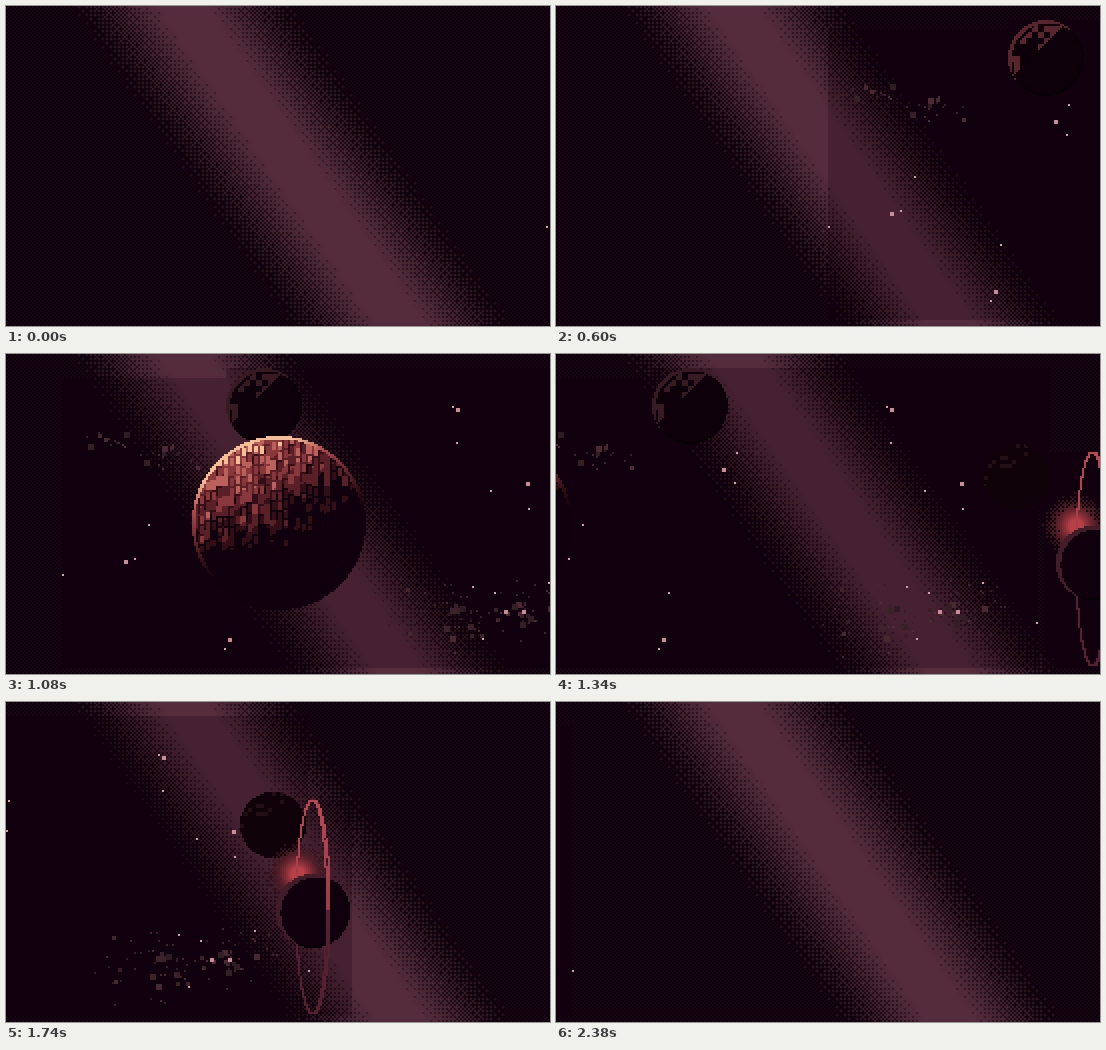
An HTML page with a canvas that plays this animation: 544 px wide and 320 px high, repeating every 2.4 s.

```html
<!DOCTYPE html>
<html lang="en">
<head>
<meta charset="utf-8">
<title>Drifting planets</title>
<style>
html, body { margin: 0; width: 100%; height: 100%; overflow: hidden; background: #11000e; }
canvas { display: block; width: 544px; height: 320px; }
</style>
</head>
<body>
<canvas id="stage" width="544" height="320"></canvas>
<script>
const W = 544, H = 320, STEP = 20, FRAMES = 120, CELL = 2;
const ctx = document.getElementById('stage').getContext('2d');
ctx.imageSmoothingEnabled = false;

// Each layer drifts left at its own constant speed, in pixels per step.
const LAYERS = {
  stars: { start: 540, speed: 8.945 },
  moon: { start: 780.3, speed: 9.66 },
  darkMoon: { start: 1108.2, speed: 9.66 },
  ringed: { start: 1305.9, speed: 11.47 },
  giant: { start: 1697.6, speed: 26.4 }
};

const clamp = v => Math.max(0, Math.min(1, v));
const snap = v => Math.round(v / CELL) * CELL;
const mix = (a, b, t) => a.map((v, i) => Math.round(v + (b[i] - v) * t));
const rgb = c => `rgb(${c.join(',')})`;

// Ordered 4x4 dither threshold, built by interleaving coordinate bits.
function threshold(x, y) {
  const d = x ^ y;
  const rank = (d & 1) * 8 + (y & 1) * 4 + (d >> 1 & 1) * 2 + (y >> 1 & 1);
  return (rank + 0.5) / 16;
}

function hash(x, y) {
  const s = Math.sin(x * 127.1 + y * 311.7) * 43758.5453;
  return s - Math.floor(s);
}
const spread = (i, seed) => hash(i, seed) + hash(i, seed + 1) - 1;

function ramp(colors, v) {
  const p = clamp(v) * (colors.length - 1), i = Math.min(Math.floor(p), colors.length - 2);
  return mix(colors[i], colors[i + 1], p - i);
}

function layer(w, h) {
  const c = document.createElement('canvas');
  c.width = w;
  c.height = h;
  return [c, c.getContext('2d')];
}

// shade returns a colour for a cell, or nothing.
function sprite(w, h, shade) {
  const [c, g] = layer(w * CELL, h * CELL);
  for (let y = 0; y < h; y++) {
    for (let x = 0; x < w; x++) {
      const color = shade(x, y);
      if (!color) continue;
      g.fillStyle = rgb(color);
      g.fillRect(x * CELL, y * CELL, CELL, CELL);
    }
  }
  return c;
}

function sphere(radius, shade) {
  const size = Math.ceil(radius * 2);
  return sprite(size, size, (x, y) => {
    const nx = (x + 0.5 - size / 2) / radius, ny = (y + 0.5 - size / 2) / radius;
    const d = Math.hypot(nx, ny);
    if (d <= 1) return shade(nx, ny, d, x, y);
  });
}

function nebula(base, alt, edge, core) {
  return sprite(W / CELL, H / CELL, (x, y) => {
    const d = Math.abs(x * CELL - 176 - y * CELL * 0.6875);
    const v = clamp((114 - d) / 90);
    const ground = (x + y) & 1 ? base : alt;
    const lit = mix(edge, core, v);
    return v > threshold(x, y) ? lit : mix(ground, lit, v * v * 0.75);
  });
}

const backdrop = nebula([22, 5, 18], [13, 0, 11], [32, 18, 22], [84, 44, 60]);
const haze = nebula([17, 0, 14], [17, 0, 14], [24, 11, 12], [69, 33, 49]);

const NIGHT = [16, 0, 13];
const LAVA = [NIGHT, [58, 18, 25], [112, 42, 48], [172, 74, 76], [244, 190, 150]];
const giant = sphere(43.5, (nx, ny, d, x, y) => {
  const light = -0.4 * nx - 0.85 * ny + 0.12 * Math.sqrt(1 - d * d) - 0.03;
  if (d > 0.965) return ramp(LAVA, light + 0.25);
  const col = Math.floor(x / 3), shift = y + Math.floor(hash(col, 5) * 6);
  const row = Math.floor(shift / 5);
  const seam = (x % 3 === 0 || shift % 5 === 0) && hash(row, col) > 0.35;
  const v = light + spread(col * 31 + row, 8) * 0.35 - (seam ? 0.3 : 0);
  return ramp(LAVA, Math.round(v * 5) / 5);
});

function cratered(tone) {
  return sphere(19, (nx, ny, d, x, y) => {
    const depth = -nx - ny;
    if (d > 0.95 && depth < -0.1) return [7, 0, 6];
    const rim = Math.hypot(nx - 0.07, ny - 0.08) > 0.99;
    const block = depth > 0.4 && depth < 1.15 && hash(x / 3 | 0, y / 3 | 0) > 0.66;
    return rim || block ? tone : [13, 0, 10];
  });
}
const moonBright = cratered([88, 37, 46]);
const moonDim = cratered([55, 26, 34]);

const darkMoon = sphere(16.5, (nx, ny, d, x, y) => {
  const v = -0.5 * nx - 0.6 * ny;
  return hash(x >> 1, y >> 1) < v * 0.4 ? [34, 15, 20] : [15, 2, 9];
});

const ringedBody = sphere(18.5, (nx, ny, d) => {
  if (d > 0.95 && nx + ny > 0.5) return [9, 0, 7];
  return Math.hypot(nx - 0.1, ny - 0.06) > 0.97 && nx < 0.5 ? [66, 28, 40] : NIGHT;
});

const glow = sprite(34, 34, (x, y) => {
  const v = 1 - Math.hypot(x - 16.5, y - 16.5) / 17;
  if (v > 0 && v * 2 > threshold(x, y)) return mix([48, 17, 26], [184, 65, 72], clamp(v * v * 1.5));
});

// Distances are measured from the left end of the star layer.
const ANCHORS = [[64, 208], [228, 116], [168, 286], [396, 56], [466, 130], [444, 258], [462, 258]];
const CLUMPS = [
  { x: 44, y: 86, w: 32, h: 14, count: 13 },
  { x: 110, y: 99, w: 40, h: 18, count: 18 },
  { x: 395, y: 264, w: 75, h: 40, count: 50 },
  { x: 460, y: 250, w: 62, h: 40, count: 42 }
];

const starField = (() => {
  const [c, g] = layer(W, H);
  const dot = (x, y, size, color) => {
    g.fillStyle = color;
    g.fillRect(snap(x - size / 2), snap(y - size / 2), size, size);
  };
  CLUMPS.forEach(({ x, y, w, h, count }, k) => {
    for (let i = 0; i < count; i++) {
      const size = i % 4 ? 2 : i % 8 ? 6 : 4;
      const color = mix([46, 28, 34], [80, 44, 53], hash(i, k + 20));
      dot(x + spread(i, k * 4) * w, y + spread(i, k * 4 + 2) * h, size, rgb(color));
    }
  });
  ANCHORS.forEach(([x, y], k) => {
    for (let i = 0; i < 2; i++) {
      dot(x + spread(k * 2 + i, 40) * 50, y + spread(k * 2 + i, 44) * 50, 2, '#d0a0a8');
    }
    dot(x, y, 4, '#c98c98');
  });
  dot(1, 221, 2, '#d0a0a8');
  dot(540, 269, 2, '#d0a0a8');
  return c;
})();

function ringHalf(side) {
  const [c, g] = layer(40, 220);
  const trace = (rx, ry) => {
    for (let a = -Math.PI / 2; a <= Math.PI / 2; a += 0.008) {
      const y = Math.sin(a) * ry;
      g.fillStyle = y < 4 ? rgb(mix([156, 60, 70], [184, 72, 84], -y / ry)) : '#55202f';
      g.fillRect(snap(20 + side * Math.cos(a) * rx) - 2, snap(110 + y) - 2, 2, 2);
    }
  };
  trace(17, 107);
  if (side > 0) trace(14, 106);
  return c;
}
const ringBack = ringHalf(-1), ringFront = ringHalf(1);

function clear(left, top, right, bottom) {
  const x = Math.max(0, snap(left)), w = Math.min(W, snap(right)) - x;
  if (w > 0) ctx.drawImage(haze, x, top, w, bottom - top, x, top, w, bottom - top);
}

function place(img, cx, cy) {
  ctx.drawImage(img, snap(cx - img.width / 2), snap(cy - img.height / 2));
}

function draw(n) {
  const at = name => LAYERS[name].start - LAYERS[name].speed * n;
  const stars = at('stars'), moon = at('moon'), dark = at('darkMoon');
  const ringed = at('ringed'), giantX = at('giant');

  ctx.drawImage(backdrop, 0, 0);
  clear(stars, 24, stars + 541, 314);
  clear(moon - 38, 14, dark + 33, 157);
  clear(ringed - 49, 98, ringed + 37, 314);

  ctx.drawImage(starField, snap(stars), 0);
  place(giantX < W + 87 ? moonDim : moonBright, moon, 52);
  place(darkMoon, dark, 123);
  place(giant, giantX, 169);
  place(glow, ringed - 17, 172);
  place(ringBack, ringed, 206);
  place(ringedBody, ringed - 1, 209);
  place(ringFront, ringed, 206);
}

const origin = performance.now();
function tick() {
  draw(Math.floor((performance.now() - origin) / STEP) % FRAMES);
  requestAnimationFrame(tick);
}
tick();
</script>
</body>
</html>
```
